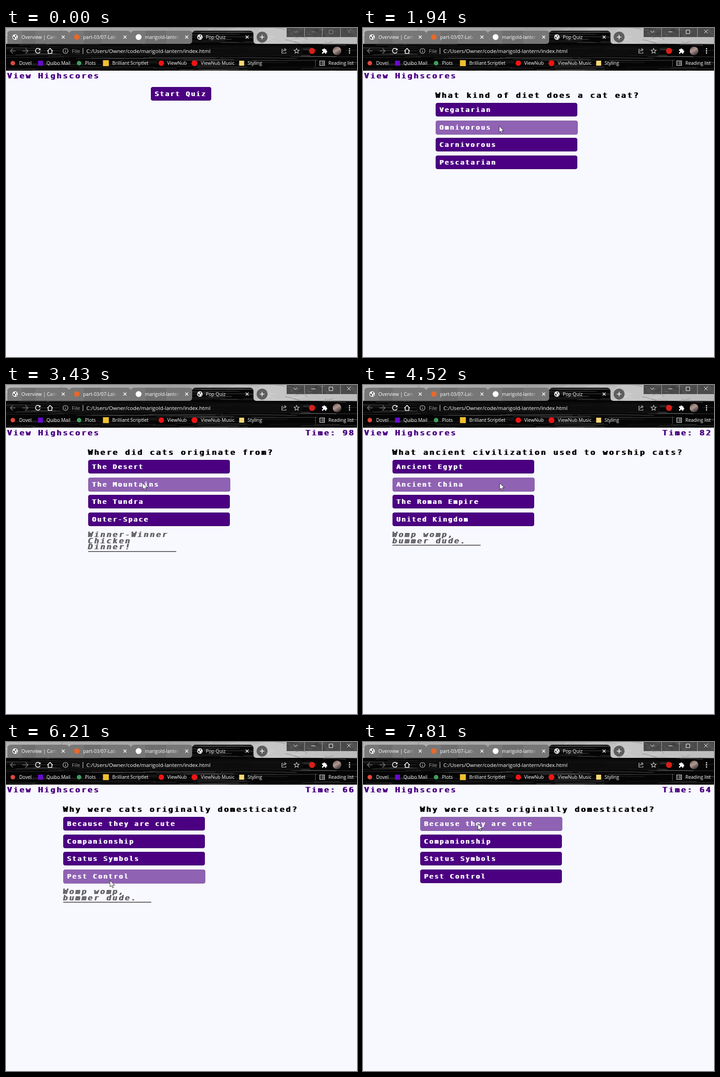
Animation of 773 by 725 pixels, one loop 8 s. Source, as an HTML page:

```html
<!DOCTYPE html>
<html lang="en">
<head>
<meta charset="utf-8">
<title>Pop Quiz</title>
<style>
  html, body { margin: 0; width: 100%; height: 100%; overflow: hidden; background: #f8f8ff; }
  #stage { position: relative; width: 773px; height: 725px; overflow: hidden; background: #f8f8ff; }
  #stage svg { position: absolute; left: 0; top: 0; }
  #chrome text { font-family: "Open Sans", "Noto Sans", sans-serif; font-size: 10.4px; fill: #fff; }
  #chrome .url { font-size: 11.6px; }
  .pix {
    position: absolute; white-space: nowrap; color: #4b0082;
    font: 16.5px/20px "DejaVu Sans Mono", monospace;
    letter-spacing: 3.7px; text-shadow: 1px 0, -1px 0;
  }
  .ask { top: 139px; color: #000; }
  .btn {
    position: absolute; box-sizing: border-box; width: 312px; height: 30px; padding-left: 8px;
    border: 1px solid #3a0066; border-radius: 4px; background: #4b0082; color: #fff;
    font: 14px/28px "DejaVu Sans Mono", monospace;
    letter-spacing: 2.97px; text-shadow: .9px 0, -.9px 0; white-space: nowrap;
  }
  .btn.hover { opacity: .6; }
  .note {
    top: 323px; width: 194px; padding-bottom: 2px; white-space: normal;
    border-bottom: 2.5px solid; color: #636366; font-style: italic; line-height: 13.5px;
  }
  [hidden] { display: none !important; }
</style>
</head>
<body>
<div id="stage">
  <svg id="chrome" width="773" height="94" viewBox="0 0 773 94">
    <defs>
      <linearGradient id="fade"><stop offset=".8" stop-color="#fff"/><stop offset="1" stop-color="#fff" stop-opacity=".1"/></linearGradient>
      <linearGradient id="strip"><stop stop-color="#b4b4b4"/><stop offset=".5" stop-color="#a2a2a2"/><stop offset=".75" stop-color="#c6c6c6"/><stop offset="1" stop-color="#bdbdbd"/></linearGradient>
      <linearGradient id="face" x2=".6" y2="1"><stop stop-color="#5a4a48"/><stop offset=".5" stop-color="#b29a92"/><stop offset="1" stop-color="#40363a"/></linearGradient>
      <clipPath id="bar"><path d="M0 94V35H403Q410 35 410 28V14Q410 6 418 6H537Q545 6 545 14V28Q545 35 552 35H773V94Z"/></clipPath>
      <clipPath id="top"><path d="M0 0H773V35H0Z"/></clipPath>
      <clipPath id="caps"><path d="M618 0H773V20H618Z"/></clipPath>
      <g id="globe">
        <circle r="6" fill="#fff"/>
        <path d="M-4.6 -1.5L-1 0L0 2L-1.5 4.6Q-4.5 2.5 -4.6 -1.5ZM0 -4.7L3.6 -2.8L1.8 -.4L-.6 -1.6ZM2 1.4L4.6 .8Q4 3 2.2 4Z" fill="#444"/>
      </g>
      <path id="x" d="M-3.2 -3.2L3.2 3.2M3.2 -3.2L-3.2 3.2" stroke="#fff" stroke-width="1.4"/>
    </defs>
    <rect width="773" height="35" fill="url(#strip)"/>
    <g id="marble" clip-path="url(#top)" fill="none"></g>
    <g id="tabs"></g>
    <g clip-path="url(#bar)">
      <rect width="773" height="94" fill="#050505"/>
      <g id="grain" fill="none" stroke="#b4b4b4"></g>
    </g>
    <g id="active"></g>
    <circle cx="564" cy="20" r="12" fill="#5e5e5e"/>
    <path d="M559 20H569M564 15V25" stroke="#fff" stroke-width="1.6"/>
    <rect x="618" width="155" height="20" fill="#4b4b4b"/>
    <g id="smoke" clip-path="url(#caps)"></g>
    <path d="M657.5 0V20M696.5 0V20M736.5 0V20" stroke="#aaa"/>
    <path id="winIcons" d="M633 6L637 10L641 6M672.5 8.5H681.5M711.5 4.5H719.5V12.5H711.5ZM751 4L759 12M759 4L751 12" fill="none" stroke="#fff"/>

    <rect x="117" y="38" width="538" height="25" rx="12.5" fill="#0d0d0e" fill-opacity=".85"/>
    <g fill="none" stroke="#fff" stroke-width="1.6">
      <path d="M21 50.5H10M15 45L9.7 50.5L15 56M37 50.5H48M43 45L48.5 50.5L43 56" stroke="#707070"/>
      <path d="M74.5 47A5.3 5.3 0 1 0 75.2 52"/>
      <path d="M76 44.5V49H71.5Z" fill="#fff" stroke="none"/>
      <path d="M91 51L97 45L103 51M93 50V56H101V50"/>
      <g stroke="#c8c8c8" stroke-width="1.2">
        <circle cx="131" cy="50.5" r="5.5"/>
        <path d="M131 50V53.5M131 47V48.3M169.5 44V57"/>
        <path d="M610 47H607.5V55.5H616.5V53M609.5 52.5Q610.5 48 615 48M613 45L617 48L613 51"/>
        <path d="M640 45L641.6 48.7L645.6 49L642.5 51.7L643.5 55.6L640 53.5L636.5 55.6L637.5 51.7L634.4 49L638.4 48.7Z"/>
      </g>
    </g>
    <circle cx="674" cy="50.5" r="6.7" fill="#d81f1a"/>
    <path d="M696 47H699A2 2 0 1 1 703 47H705.5V50A2 2 0 1 1 705.5 54V56.5H702.5A1.8 1.8 0 1 0 699 56.5H696V53.5A1.8 1.8 0 1 0 696 50Z" fill="#fff"/>
    <circle cx="729" cy="50.5" r="9.5" fill="url(#face)"/>
    <g fill="#fff"><circle cx="756.5" cy="46" r="1.4"/><circle cx="756.5" cy="50.5" r="1.4"/><circle cx="756.5" cy="55" r="1.4"/></g>
    <text class="url" x="145" y="54.5" style="fill:#a0a0a0">File</text>
    <text class="url" x="177" y="54.5">C:/Users/Owner/code/marigold-lantern/index.html</text>
    <g id="marks"></g>
    <path d="M681.5 70V85" stroke="#666"/>
    <path d="M691 72.5H701.5V82.5H691ZM693 75H694.5M696 75H700M693 77.5H694.5M696 77.5H700M693 80H694.5M696 80H700" fill="none" stroke="#fff" stroke-width="1.1"/>
    <text x="710" y="81">Reading list</text>
  </svg>

  <div class="pix" style="left:3px;top:96px">View Highscores</div>
  <div class="pix" id="clock" style="left:660px;top:96px"></div>
  <div id="scenes"></div>

  <svg width="773" height="725">
    <g id="cursor">
      <circle id="press" r="10.5" fill="#cfb61c" fill-opacity=".74"/>
      <path d="M0 0V14.2L3.3 11.2L5.5 16.3L7.7 15.3L5.6 10.4H10.2Z" fill="#fff" stroke="#15151c" stroke-width=".9"/>
    </g>
  </svg>
</div>

<script>
const $ = id => document.getElementById(id);

// Browser frame
let seed = 7;
const rnd = (a, b) => {
  seed = (seed + 0x6D2B79F5) | 0;
  let n = Math.imul(seed ^ (seed >>> 15), 1 | seed);
  n ^= n + Math.imul(n ^ (n >>> 7), 61 | n);
  return a + (b - a) * ((n ^ (n >>> 14)) >>> 0) / 4294967296;
};
const repeat = (n, fn) => Array.from({ length: n }, (_, i) => fn(i)).join('');

$('marble').innerHTML = repeat(60, () => {
  const x = rnd(-10, 773), y = rnd(-4, 35);
  return `<path d="M${x} ${y}q${rnd(-20, 20)} ${rnd(-9, 9)} ${rnd(10, 40)} ${rnd(-14, 14)}"
    stroke="${rnd(0, 1) < .5 ? '#eee' : '#777'}" stroke-width="${rnd(.5, 2)}" opacity="${rnd(.15, .45)}"/>`;
});
$('grain').innerHTML = repeat(150, () => {
  const x = rnd(-80, 760), y = rnd(7, 94), w = rnd(50, 180);
  return `<path d="M${x} ${y}c${w * .3} ${rnd(-2, 2)} ${w * .6} ${rnd(-2, 2)} ${w} ${rnd(-1, 1)}"
    stroke-width="${rnd(.5, 1.5)}" opacity="${rnd(.08, .3) + x / 5000}"/>`;
});
$('smoke').innerHTML = repeat(40, () =>
  `<ellipse cx="${rnd(618, 773)}" cy="${rnd(0, 20)}" rx="${rnd(2, 9)}" ry="${rnd(1, 4)}"
    fill="${rnd(0, 1) < .5 ? '#777' : '#2c2c2c'}" opacity=".22"/>`);

const dot = (x, y, r, fill) => `<circle cx="${x}" cy="${y}" r="${r}" fill="${fill}"/>`;
const box = (x, y, s, fill) => `<rect x="${x - s / 2}" y="${y - s / 2}" width="${s}" height="${s}" fill="${fill}"/>`;
const label = (x, y, s, fill = '#fff') => `<text x="${x}" y="${y}" style="fill:${fill}">${s}</text>`;
const use = (id, x, y) => `<use href="#${id}" x="${x}" y="${y}"/>`;

$('tabs').innerHTML = [
  ['Overview | Cam', use('globe', 20, 20)],
  ['part-03/07-Lab-', dot(156, 20, 6, '#e8682a')],
  ['marigold-lanter', dot(292, 20, 6.5, '#fff')]
].map(([name, icon], i) => {
  const x = 3 + i * 136;
  return `<path d="M${x} 35V14Q${x} 6 ${x + 8} 6H${x + 128}Q${x + 136} 6 ${x + 136} 14V35Z" fill="#747474" fill-opacity=".93"/>
    <rect x="${x + 32}" y="6" width="${30 + i * 8}" height="29" fill="#505050" opacity=".22"/>
    <path d="M${x + 136.5} 12V29" stroke="#c4c4c4"/>` + icon +
    label(x + 31, 24, name, 'url(#fade)') + use('x', x + 123, 20);
}).join('');
$('active').innerHTML = use('globe', 427, 20) + label(440, 24, 'Pop Quiz') + use('x', 531, 20);

$('marks').innerHTML = [
  [15, 29, 'Dovel', dot, 5, '#e2483b'],
  [76, 89, 'Quibo Mail', box, 11, '#6a0ad0'],
  [161, 174, 'Plots', dot, 5, '#3f9e5c'],
  [220, 234, 'Brilliant Scriptlet', box, 13, '#f0c030'],
  [342, 355, 'ViewNub', dot, 6, '#f01414'],
  [415, 429, 'ViewNub Music', dot, 6.5, '#f01414'],
  [519, 532, 'Styling', box, 11, '#fbd775']
].map(([ix, tx, s, shape, size, fill]) => shape(ix, 77.5, size, fill) + label(tx, 81, s)).join('');

// Quiz: start time, left edge, question, answers
const quiz = [
  [1210, 160, 'What kind of diet does a cat eat?', ['Vegatarian', 'Omnivorous', 'Carnivorous', 'Pescatarian']],
  [2630, 181, 'Where did cats originate from?', ['The Desert', 'The Mountains', 'The Tundra', 'Outer-Space']],
  [4520, 65, 'What ancient civilization used to worship cats?', ['Ancient Egypt', 'Ancient China', 'The Roman Empire', 'United Kingdom']],
  [6210, 126, 'Why were cats originally domesticated?', ['Because they are cute', 'Companionship', 'Status Symbols', 'Pest Control']]
];
const win = 'Winner-Winner Chicken Dinner!', lose = 'Womp womp, bummer dude.';
// [from, to, left, text]
const notes = [[2630, 4520, 181, win], [4520, 4650, 65, lose], [6210, 6560, 126, lose]];
const clock = [[0, ''], [2220, 99], [3250, 98], [4250, 97], [4520, 82], [5250, 81], [6210, 66], [6280, 65], [7300, 64]];
const clicks = [[1080, 1210], [2570, 2630], [4380, 4520], [6080, 6210]];
// Cursor tip: time, x, y
const path = [
  [180, 677, 657], [480, 500, 330], [810, 393, 144],
  [1480, 393, 144], [1610, 340, 178], [1750, 335, 181], [1940, 300, 216], [2290, 281, 257],
  [2890, 281, 257], [3430, 301, 216],
  [5110, 301, 216], [5390, 252, 243], [5880, 229, 305],
  [6560, 229, 305], [6800, 283, 281], [7000, 290, 244], [7320, 268, 222], [7400, 266, 220], [7810, 253, 180]
];

const add = (parent, cls, text, left) => {
  const el = document.createElement('div');
  el.className = cls;
  el.textContent = text;
  el.style.left = left + 'px';
  return parent.appendChild(el);
};
const addButton = (scene, text, x, y, w) => {
  const el = add(scene.el, 'btn', text, x);
  el.style.top = y + 'px';
  el.style.width = w + 'px';
  scene.buttons.push({ el, x, y, w });
};
const addScene = from => ({ from, el: $('scenes').appendChild(document.createElement('div')), buttons: [] });

const intro = addScene(0);
addButton(intro, 'Start Quiz', 319, 130, 133);
const scenes = [intro, ...quiz.map(([from, left, ask, answers]) => {
  const scene = addScene(from);
  add(scene.el, 'pix ask', ask, left);
  answers.forEach((text, i) => addButton(scene, text, left, Math.round(165.4 + i * 38.4), 312));
  return scene;
})];
const noteEls = notes.map(([, , left, text]) => add($('scenes'), 'pix note', text, left));

const during = (t, [from, to]) => t >= from && t < to;

function cursorAt(t) {
  const i = path.findIndex(p => p[0] > t);
  if (i < 0) return path[path.length - 1].slice(1);
  if (i === 0) return path[0].slice(1);
  const [t0, x0, y0] = path[i - 1], [t1, x1, y1] = path[i];
  const u = (t - t0) / (t1 - t0);
  return [x0 + (x1 - x0) * u, y0 + (y1 - y0) * u];
}

function draw(t) {
  const [x, y] = cursorAt(t), shown = t >= 180;
  const now = scenes.filter(s => s.from <= t).pop();
  scenes.forEach(s => { s.el.hidden = s !== now; });
  now.buttons.forEach(b => {
    const over = shown && x >= b.x && x <= b.x + b.w && y >= b.y && y <= b.y + 30;
    b.el.classList.toggle('hover', over);
    b.el.style.width = b.w + over + 'px';
    b.el.style.height = 30 + over + 'px';
  });
  noteEls.forEach((el, i) => { el.hidden = !during(t, notes[i]); });
  const left = clock.filter(c => c[0] <= t).pop()[1];
  $('clock').textContent = left && 'Time: ' + left;
  $('cursor').setAttribute('transform', `translate(${x} ${y})`);
  $('cursor').style.display = shown ? '' : 'none';
  $('press').style.display = clicks.some(c => during(t, c)) ? '' : 'none';
  $('winIcons').setAttribute('stroke', t < 1080 ? '#8c8c8c' : '#fff');
}

const begin = performance.now();
(function tick() {
  draw((performance.now() - begin) % 8000);
  requestAnimationFrame(tick);
})();
</script>
</body>
</html>
```
